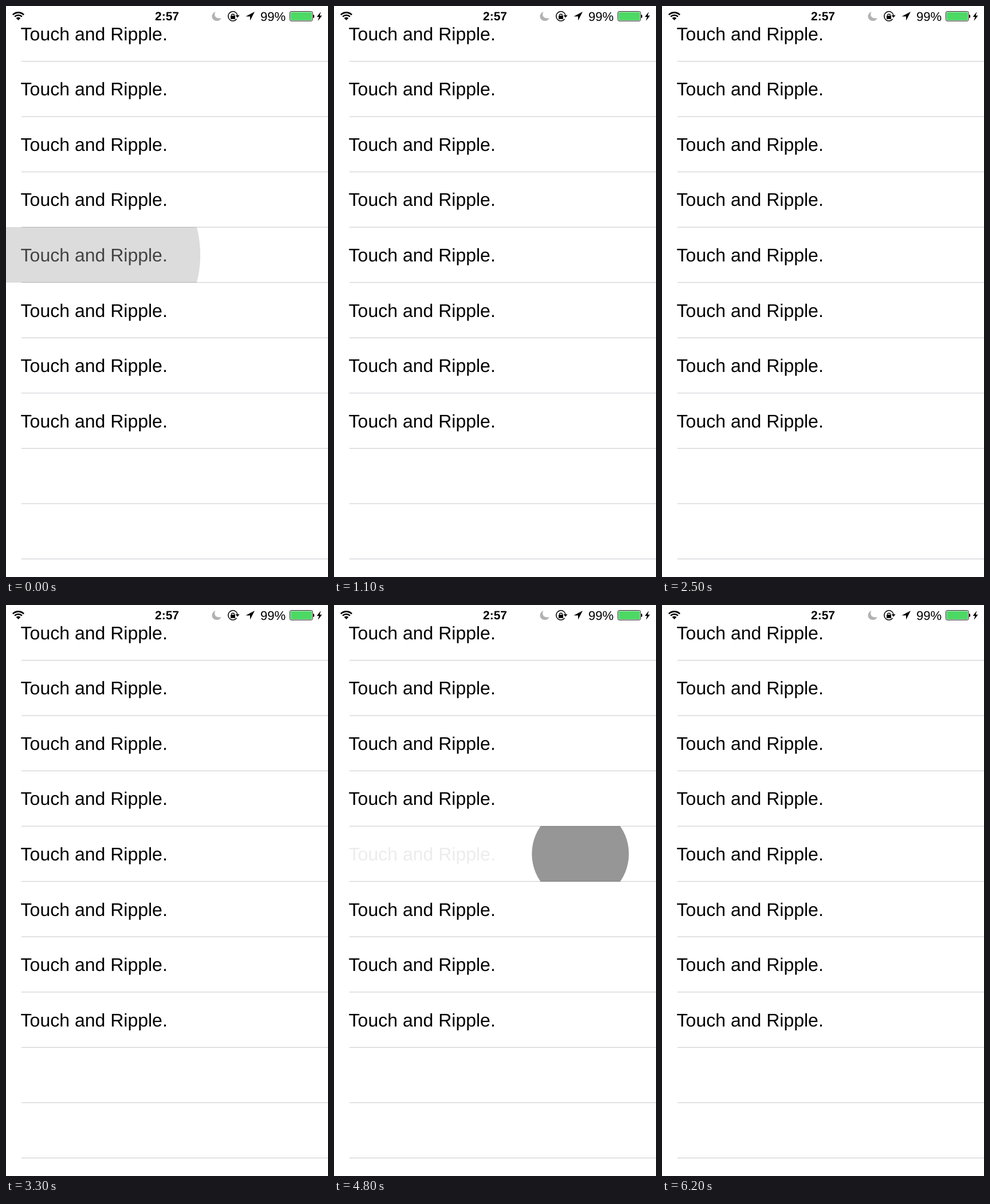
An HTML page with a canvas for the animation above (6300 ms loop, 562 by 997 pixels).

```html
<!DOCTYPE html>
<html lang="en">
<head>
<meta charset="utf-8">
<title>Touch and Ripple</title>
<style>
  html, body { margin: 0; width: 100%; height: 100%; overflow: hidden; background: #fff; }
  canvas { display: block; }
</style>
</head>
<body>
<canvas id="stage" width="562" height="997"></canvas>
<script>
const ctx = document.getElementById('stage').getContext('2d');
const WIDTH = 562, HEIGHT = 997, LOOP = 6300, STEP = 100;
const ROW = 96.55, ROWS = 8, LINES = 10, FADE = 450;
const FONT = '"Liberation Sans", Arial, sans-serif';

// A tap that begins before zero is already under way when the loop starts.
const taps = [
  { row: 4, x: 147, start: -328 },
  { row: 5, x: 443.5, start: 420 },
  { row: 6, x: 272.5, start: 1630 },
  { row: 7, x: 310, start: 2595 },
  { row: 5, x: 401, start: 3840 },
  { row: 4, x: 430, start: 4720 }
];

const lineY = index => ROW * index - 0.5;

function polygon(points, color) {
  ctx.fillStyle = color;
  ctx.beginPath();
  points.forEach(([x, y]) => ctx.lineTo(x, y));
  ctx.closePath();
  ctx.fill();
}

function strokeArc(x, y, radius, from, to, width) {
  ctx.lineWidth = width;
  ctx.beginPath();
  ctx.arc(x, y, radius, from, to);
  ctx.stroke();
}

function label(text, x, y, font, color = '#000', align = 'left') {
  ctx.font = `${font} ${FONT}`;
  ctx.textRendering = 'geometricPrecision';
  ctx.fillStyle = color;
  ctx.textAlign = align;
  ctx.fillText(text, x, y);
}

function drawWifi() {
  const x = 21.5, y = 25, from = -Math.PI * 0.75, to = -Math.PI * 0.25;
  ctx.strokeStyle = ctx.fillStyle = '#000';
  strokeArc(x, y, 13.6, from, to, 2.6);
  strokeArc(x, y, 9, from, to, 2.6);
  ctx.beginPath();
  ctx.moveTo(x, y);
  ctx.arc(x, y, 5.6, from, to);
  ctx.fill();
}

function drawMoon() {
  ctx.fillStyle = '#b2b2b4';
  ctx.beginPath();
  ctx.moveTo(365.5, 10);
  ctx.bezierCurveTo(356, 14, 358.5, 26, 368, 26);
  ctx.bezierCurveTo(371.5, 26, 374.5, 24, 376, 21);
  ctx.bezierCurveTo(367, 23.5, 361.5, 17, 365.5, 10);
  ctx.fill();
}

function drawRotationLock() {
  ctx.strokeStyle = ctx.fillStyle = '#000';
  strokeArc(396, 17.8, 8.2, 0.65, Math.PI * 2 - 0.1, 1.5);
  polygon([[400.5, 16.3], [407.5, 16.3], [404, 20.6]], '#000');
  ctx.fillRect(392, 17, 8, 5.8);
  strokeArc(396, 16.8, 2.5, Math.PI, 0, 1.4);
}

function drawBattery() {
  ctx.strokeStyle = '#000';
  ctx.lineWidth = 0.9;
  ctx.beginPath();
  ctx.roundRect(495.5, 9.5, 39.5, 16.7, 2.5);
  ctx.stroke();
  ctx.fillStyle = '#4cd964';
  ctx.beginPath();
  ctx.roundRect(496.8, 10.8, 36.9, 14.1, 1.5);
  ctx.fill();
  ctx.fillStyle = '#000';
  ctx.beginPath();
  ctx.roundRect(536, 15, 2, 6, [0, 2, 2, 0]);
  ctx.fill();
  polygon([[549.5, 10], [542.5, 19], [546.3, 19], [544.5, 26], [551.5, 16.7], [547.5, 16.7]], '#000');
}

function drawStatusBar() {
  drawWifi();
  label('2:57', 281, 25.3, 'bold 21px', '#000', 'center');
  drawMoon();
  drawRotationLock();
  polygon([[434, 10], [418.5, 18.2], [426, 18.2], [426, 25.5]], '#000');
  label('99%', 444, 25.5, '22px');
  drawBattery();
}

function drawRipple(tap, progress) {
  const top = Math.round(lineY(tap.row) + 0.5);
  const bottom = Math.round(lineY(tap.row + 1) + 0.5);
  ctx.save();
  ctx.beginPath();
  ctx.rect(0, top, WIDTH, bottom - top);
  ctx.clip();
  ctx.fillStyle = `rgba(0, 0, 0, ${0.5 * (1 - progress)})`;
  ctx.beginPath();
  ctx.arc(tap.x, ROW * (tap.row + 0.5), 50 + 195 * progress, 0, Math.PI * 2);
  ctx.fill();
  ctx.restore();
}

function drawScene(time) {
  ctx.fillStyle = '#fff';
  ctx.fillRect(0, 0, WIDTH, HEIGHT);

  ctx.fillStyle = '#c8c7cc';
  for (let i = 1; i <= LINES; i++) ctx.fillRect(27, lineY(i), WIDTH - 27, 1);

  const textAlpha = Array(ROWS).fill(1);
  for (const tap of taps) {
    const progress = (time - tap.start) / FADE;
    if (progress < 0 || progress >= 1) continue;
    drawRipple(tap, progress);
    textAlpha[tap.row] = Math.max(0, 1 - 1.125 * (1 - progress));
  }
  textAlpha.forEach((alpha, row) =>
    label('Touch and Ripple.', 25.6, 59.8 + ROW * row, '32px', `rgba(0, 0, 0, ${alpha})`));

  drawStatusBar();
}

function tick() {
  const time = performance.now() % LOOP;
  drawScene(Math.floor(time / STEP) * STEP);
  requestAnimationFrame(tick);
}
tick();
</script>
</body>
</html>
```
